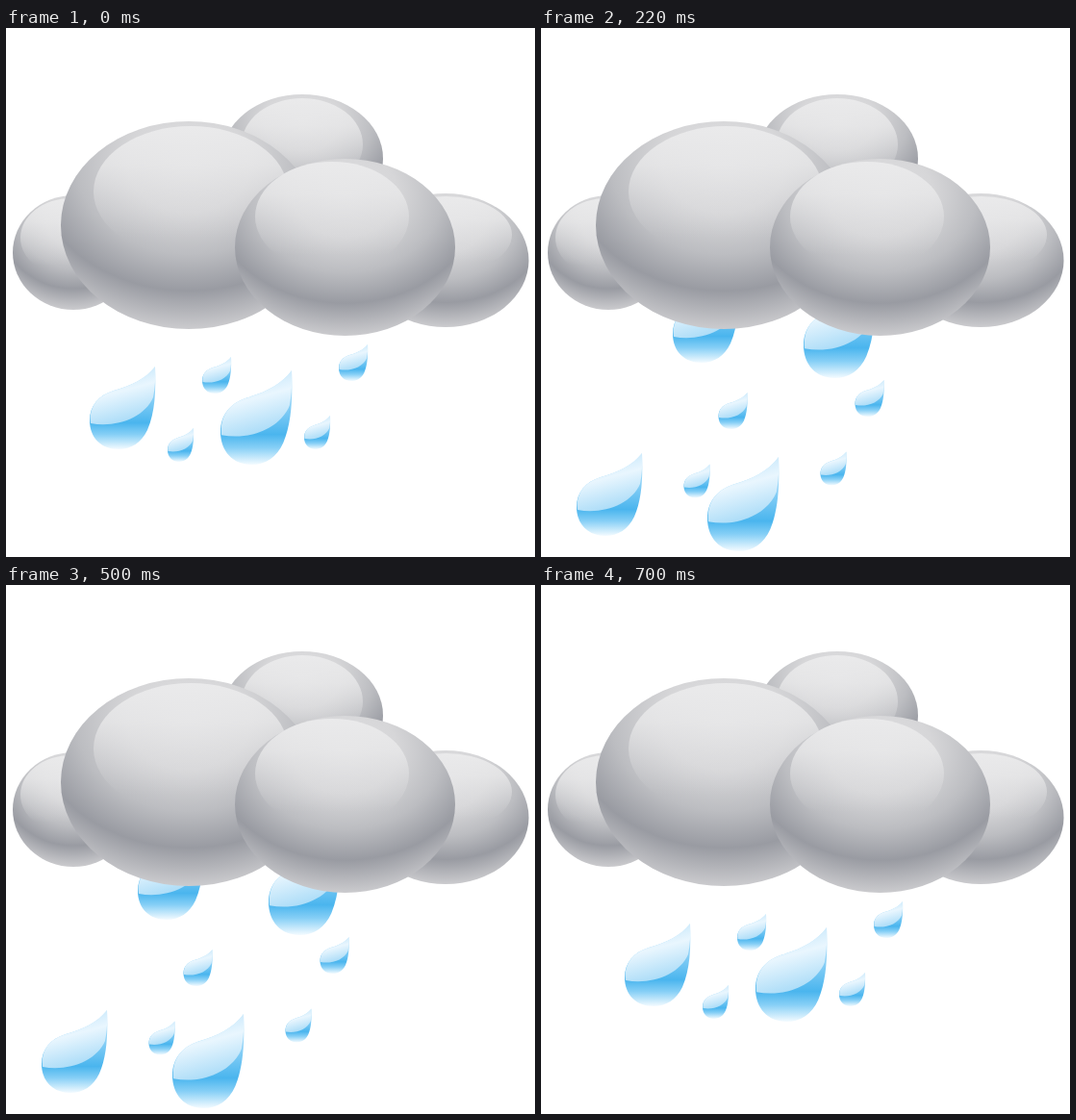
An HTML page for the animation above (800 ms loop, 550x550 px).

```html
<!DOCTYPE html>
<html lang="en">
<head>
<meta charset="utf-8">
<title>Rain cloud</title>
<style>
  html, body { margin: 0; width: 100%; height: 100%; overflow: hidden; background: #fff; }
  svg { display: block; width: 550px; height: 550px; }
</style>
</head>
<body>
<svg viewBox="0 0 550 550">
  <defs>
    <radialGradient id="puff" cx=".5" cy=".2" r=".8">
      <stop offset="0" stop-color="#e0e0e2"/>
      <stop offset=".3" stop-color="#d6d6d8"/>
      <stop offset=".55" stop-color="#bcbdc1"/>
      <stop offset=".77" stop-color="#999ba2"/>
      <stop offset="1" stop-color="#cbcbce"/>
    </radialGradient>
    <linearGradient id="shine" x2="0" y2="1">
      <stop offset="0" stop-color="#ebebec" stop-opacity=".95"/>
      <stop offset=".3" stop-color="#e8e8e9" stop-opacity=".8"/>
      <stop offset=".85" stop-color="#dcdcde" stop-opacity="0"/>
    </linearGradient>
    <linearGradient id="water" x2="0" y2="1">
      <stop offset="0" stop-color="#d8effc"/>
      <stop offset=".35" stop-color="#8fd2f7"/>
      <stop offset=".68" stop-color="#4ab5ee"/>
      <stop offset=".82" stop-color="#86cff6"/>
      <stop offset="1" stop-color="#f4fbff"/>
    </linearGradient>
    <linearGradient id="gloss" x1=".25" y1="0" x2=".55" y2="1">
      <stop offset="0" stop-color="#b9e2fa"/>
      <stop offset=".45" stop-color="#e9f6fe"/>
      <stop offset="1" stop-color="#a6daf7"/>
    </linearGradient>
    <!-- Raindrop in a 68 by 86 box -->
    <g id="drop">
      <path fill="url(#water)" d="M68 0C69 25 68 48 60 66C54 79 43 86 30 86C12 86 0 74 0 56C0 41 9 30 25 25C43 20 58 13 68 0Z"/>
      <path fill="url(#gloss)" d="M68 0C68.5 12 68 22 66 32C57 53 28 64 1 59C-1 41 9 30 25 25C43 20 58 13 68 0Z"/>
    </g>
  </defs>
  <g id="rain"></g>
  <g id="cloud"></g>
</svg>
<script>
const SVG = 'http://www.w3.org/2000/svg';
const rain = document.getElementById('rain');
const cloud = document.getElementById('cloud');

function add(parent, tag, attrs) {
  const node = document.createElementNS(SVG, tag);
  for (const key in attrs) node.setAttribute(key, attrs[key]);
  parent.append(node);
  return node;
}

// Body ellipse, then its highlight, from back to front
const puffs = [
  [70, 233.5, 63, 59.5, 68, 218, 53, 41],
  [457, 241.5, 86.5, 69.5, 457, 215, 69, 40],
  [308, 135.5, 84, 66.5, 308, 121, 63, 48],
  [190, 205, 133, 108, 192, 170, 101, 68],
  [352.5, 228, 114.5, 92, 339, 196, 80, 57]
];
for (const [cx, cy, rx, ry, hx, hy, hrx, hry] of puffs) {
  add(cloud, 'ellipse', { cx, cy, rx, ry, fill: 'url(#puff)' });
  add(cloud, 'ellipse', { cx: hx, cy: hy, rx: hrx, ry: hry, fill: 'url(#shine)' });
}

// Drops as left, top, width, height
const large = [[87, 352, 68, 86], [223, 356, 74, 98]];
const medium = [[204, 342, 30, 38], [346, 329, 30, 38]];
const small = [[168, 416, 27, 35], [310, 403, 27, 35]];
const shift = (drops, dx, dy) => drops.map(([x, y, w, h]) => [x + dx, y + dy, w, h]);

const high = [...large, ...medium, ...small];
const low = [
  ...shift(large, 50, -90), ...shift(large, -50, 90),
  ...shift(medium, -19.5, 37), ...shift(small, -19.5, 37.5)
];
const wide = [
  ...large, ...medium, [167, 415, 30, 38], [307, 403, 30, 40],
  small[1], ...shift(small, -38, 74)
];

const poses = [high, low, wide].map(drops => {
  const group = add(rain, 'g', {});
  for (const [x, y, w, h] of drops) {
    add(group, 'use', {
      href: '#drop',
      transform: `translate(${x} ${y}) scale(${w / 68} ${h / 86})`
    });
  }
  return group;
});

// The poses swap in hard steps: high, low, wide, low, high
const order = [0, 1, 2, 1, 0];
const start = performance.now();

function draw(now) {
  const time = Math.max(0, now - start) % 800;
  const current = order[Math.floor((time + 100) / 200)];
  poses.forEach((group, i) => group.setAttribute('display', i === current ? 'inline' : 'none'));
  requestAnimationFrame(draw);
}
draw(start);
</script>
</body>
</html>
```
